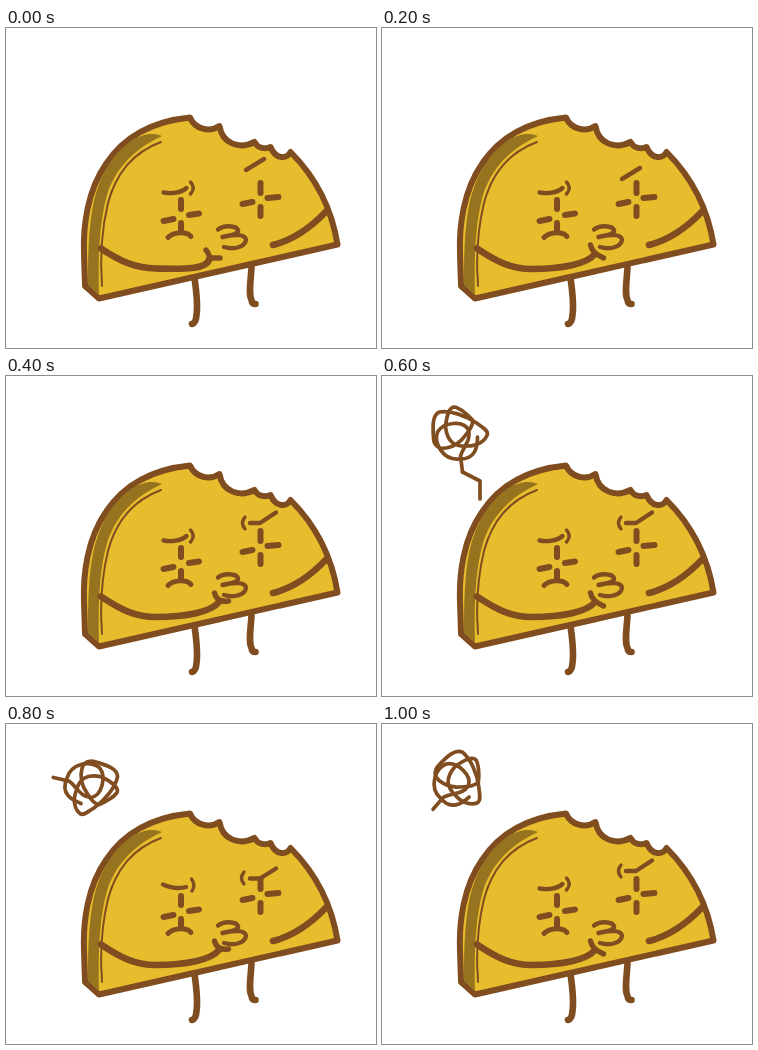
Recreate the animation shown at these times as an HTML page. Size 370 px wide and 320 px high, loop 1.2 s.

```html
<!DOCTYPE html>
<html lang="en">
<head>
<meta charset="utf-8">
<title>Grumpy snack</title>
<style>
  html, body { margin: 0; width: 100%; height: 100%; overflow: hidden; background: #fff; }
  svg { display: block; width: 100vw; height: 100vh; }
  path { fill: none; stroke: #804d20; stroke-width: 6; stroke-linecap: round; stroke-linejoin: round; }
  .thin { stroke-width: 2; }
  .mid { stroke-width: 4.4; }
  .fine { stroke-width: 3.4; }
  .arm { stroke-width: 6.6; }
  #scribble path { stroke-width: 3.7; }
</style>
</head>
<body>
<svg viewBox="0 0 370 320">
  <!-- legs -->
  <path class="arm" d="M188.500 250C190.500 264 191.500 280 190.500 287Q190 295 186 296M245.500 240C244.500 254 242.500 266 245.500 272Q246 276 249.500 276"/>
  <!-- body -->
  <path style="fill:#e8bd2d" d="M184 89.500C149 93 119 107 100 136C81 163 77 199 78 226L79 258L93 270.500L331.500 216.500C325.500 179 309.500 149 284.500 124C281 131 270 132 264.500 119C260 121 252 121 248.500 114C233 122 216 115 213.500 98C203 105 189 101 184 89.500Z"/>
  <path style="fill:#96731f;stroke:none" d="M156 108C141 101 119 112 104 135C85 163 82 198 82 257L93 266C92 230 93 196 101 167C109 142 126 122 156 108Z"/>
  <path class="thin" d="M155 114C128 124 110 145 102 175C95 204 94 231 96 258"/>
  <path class="arm" d="M320.500 183Q295 210 267 217"/>
  <!-- eyes -->
  <path d="M175 172v9M157.500 193l10-2M183 187l10-1.500M175 195v8M254.500 155v10M236.500 176l10-2M261.500 170l11-1M254.500 179v9"/>
  <path style="stroke-width:5" d="M162 209.500C167 204 180 203 185 208.500"/>
  <!-- mouth -->
  <path class="mid" d="M212 201.500C217 197 230 197 232 202C233 206 223 208 216.500 209C228 206 240 206 240 212C239 219 228 222 218 219"/>
  <path class="arm" id="arm"/>
  <path id="hand" style="stroke-width:5.4"/>
  <path class="mid" id="brows"/>
  <path class="fine" id="creases"/>
  <g id="scribble">
    <path id="tail"/>
    <path d="M3 39L1 23C4 13 12 7 9 -3C4 -13 -16 -11 -22 -1C-26 11 -16 27 -1 26C16 27 18 14 18 4"/>
    <path d="M-26 5C-27 -8 -27 -18 -20 -21C-9 -23 7 -17 17 -10C24 -5 28 -3 28 1C26 8 18 13 8 13C-4 14 -12 10 -14 -6C-13 -17 -10 -26 -5 -26C0 -25 8 -19 13 -13C14 -7 8 0 2 7C-5 14 -14 16 -20 15C-25 12 -26 8 -26 5Z"/>
  </g>
</svg>
<script>
const STEP = 200;

const raisedArm = "M95 220.500C115 234 130 241 150 241C180 241 205 236 213 226";
const arms = {
  low: ["M95 220.500C115 234 130 240 150 240.500C176 241 199 242 203 232", "M200 222Q204 227 203 230H214"],
  up: [raisedArm, "M208.500 217Q210 225 221.500 230"],
  flat: [raisedArm, "M208.500 217Q211 227 222.500 225"]
};

const leftBrow = "M157.500 164.500C165 166 175 165 180.500 160";
const leftCrease = "M184.500 154Q190 160 184.500 166";
const brows = {
  raised: [leftBrow + "M240 142L258 131", leftCrease],
  lowered: [leftBrow + "M240 151L258 140", leftCrease],
  frown: [leftBrow + "M244 147H254L270 136.500", leftCrease + "M239 141Q234 147 239 153"],
  scowl: ["M157 160.500C165 164 173 165 180 163M244 154.500H254L270 144.500", "M185.500 155Q190 161 186 167M238 148Q233 154 238 160"]
};

// The tangle turns about its centre: [x, y, degrees, extra tail]
const scribbles = {
  none: null,
  hanging: [77.5, 57, 0, "M3 39L20.500 48V66"],
  left: [85, 64, 110, ""],
  low: [78, 57, 48, ""]
};

const poses = [
  ["low", "raised", "none"],
  ["up", "lowered", "none"],
  ["flat", "frown", "none"],
  ["up", "frown", "hanging"],
  ["flat", "scowl", "left"],
  ["up", "frown", "low"]
];

const set = (id, name, value) => document.getElementById(id).setAttribute(name, value);

function frame() {
  const [arm, brow, scribble] = poses[Math.floor(performance.now() / STEP) % poses.length];
  set("arm", "d", arms[arm][0]);
  set("hand", "d", arms[arm][1]);
  set("brows", "d", brows[brow][0]);
  set("creases", "d", brows[brow][1]);

  const tangle = scribbles[scribble];
  set("scribble", "visibility", tangle ? "visible" : "hidden");
  if (tangle) {
    const [x, y, turn, tail] = tangle;
    set("scribble", "transform", `translate(${x} ${y}) rotate(${turn})`);
    set("tail", "d", tail);
  }
  requestAnimationFrame(frame);
}
frame();
</script>
</body>
</html>
```
